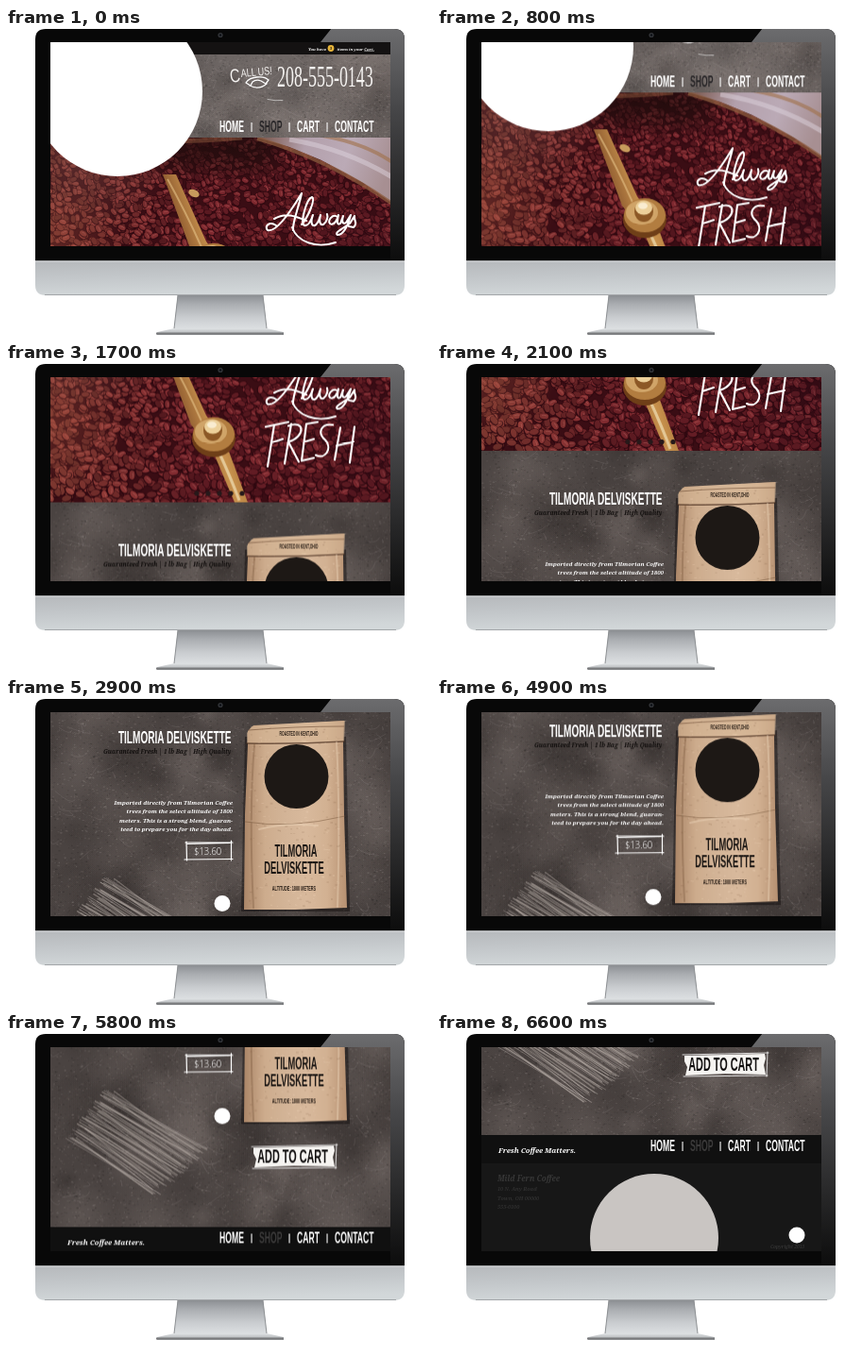
Recreate the animation shown at these times as an HTML page with a canvas. Size 450x325 px, loop 8000 ms.

```html
<!DOCTYPE html>
<html lang="en">
<head>
<meta charset="utf-8">
<title>Coffee shop on a desktop screen</title>
<style>
html, body { margin: 0; width: 100%; height: 100%; overflow: hidden; background: #fff; }
#stage { position: relative; width: 450px; height: 325px; overflow: hidden; }
#stage svg { position: absolute; left: 0; top: 0; display: block; }
#screen { position: absolute; left: 47px; top: 15px; width: 360px; height: 216px; overflow: hidden; background: #141212; }
#page { position: absolute; left: 0; top: 0; width: 360px; height: 770px; will-change: transform; animation: scroll 8s infinite; }
#page canvas { position: absolute; left: 0; top: 0; }
#stage #art { left: -47px; top: -15px; }

/* constant-speed scrolls, ten positions a second */
@keyframes scroll {
  0% { transform: translateY(0); animation-timing-function: step-end; }
  6.25% { transform: translateY(-6.8px); animation-timing-function: steps(24, end); }
  36.2499% { transform: translateY(-334.2px); animation-timing-function: step-end; }
  36.25% { transform: translateY(-327px); animation-timing-function: step-end; }
  61.25% { transform: translateY(-333.8px); animation-timing-function: steps(17, end); }
  82.4999% { transform: translateY(-565.7px); animation-timing-function: step-end; }
  82.5%, 100% { transform: translateY(-554px); }
}

.narrow { font-family: "Liberation Sans", Arial, sans-serif; font-weight: 700; }
.serif { font-family: "Noto Serif", serif; font-weight: 700; font-style: italic; }
.end { text-anchor: end; }
.mid { text-anchor: middle; }
.chalk { fill: none; stroke: #fff; stroke-linecap: round; stroke-linejoin: round; }
</style>
</head>
<body>
<div id="stage">
  <svg width="450" height="325" viewBox="0 0 450 325">
    <defs>
      <linearGradient id="chin" x1="0" y1="0" x2=".25" y2="1">
        <stop offset="0" stop-color="#b6b9bc"/><stop offset=".5" stop-color="#c3c7ca"/><stop offset="1" stop-color="#d2d7d9"/>
      </linearGradient>
      <linearGradient id="neck" x1="0" y1="0" x2="0" y2="1">
        <stop offset="0" stop-color="#85888c"/><stop offset=".25" stop-color="#a9acb0"/>
        <stop offset=".6" stop-color="#cbced1"/><stop offset=".85" stop-color="#dcdfe1"/><stop offset="1" stop-color="#a5a7aa"/>
      </linearGradient>
      <linearGradient id="gloss" x1="0" y1="0" x2="0" y2="1">
        <stop offset="0" stop-color="#6c6c6e"/><stop offset=".35" stop-color="#464648"/><stop offset="1" stop-color="#0c0c0c"/>
      </linearGradient>
      <clipPath id="case"><path d="M31 12Q31 1 42 1H411Q422 1 422 12V247H31Z"/></clipPath>
    </defs>
    <path d="M182 281H272L276 318 294 322V325H160V322L178 318Z" fill="url(#neck)"/>
    <path d="M182 283L178 318M272 283L276 318" stroke="#8d9093" fill="none"/>
    <path d="M159 323.5H294" stroke="#77787a" stroke-width="2"/>
    <g clip-path="url(#case)">
      <path d="M31 0H422V247H31Z" fill="#080808"/>
      <path d="M345 0H422V247H407V15H333Z" fill="url(#gloss)"/>
    </g>
    <path d="M31 246.500H422V272Q422 283 411 283H42Q31 283 31 272Z" fill="url(#chin)"/>
    <path d="M31 247H422" stroke="#dfe1e3"/>
    <path d="M41 282.500H413" stroke="#a2a5a8"/>
    <circle cx="227" cy="7.500" r="2.600" fill="#34363a"/><circle cx="227" cy="7.500" r="1.200" fill="#0d1016"/>
  </svg>

  <div id="screen"><div id="page">
    <canvas id="paint" width="360" height="770"></canvas>
    <svg id="art" width="450" height="800" viewBox="0 0 450 800">
      <!-- header -->
      <circle cx="118" cy="67" r="90" fill="#fff"/>
      <g class="serif" font-size="4.100" fill="#fff">
        <text x="320" y="23.500">You have</text>
        <circle cx="344" cy="21.500" r="3.400" fill="#e8b53a"/>
        <text class="mid" x="344" y="23" fill="#141212">3</text>
        <text class="end" x="390" y="23.500">items in your <tspan text-decoration="underline">Cart.</tspan></text>
      </g>
      <g fill="#f6f4f2" font-family="Liberation Serif, serif">
        <text font-size="31" transform="translate(287 62) scale(.58 1)">208-555-0143</text>
        <g font-family="Liberation Sans, sans-serif">
          <text font-size="20" transform="translate(238 58) rotate(-8) scale(.75 1)">C</text>
          <text font-size="12" transform="translate(249 52) rotate(-5) scale(.75 1)">ALL US!</text>
        </g>
      </g>
      <path class="chalk" stroke-width="1.300" d="M254 58C258 51 273 50 278 55L275 59 270 56Q265 54 261 57L259 61 254 58ZM258 61Q268 66 276 59"/>
      <path class="chalk" stroke-width=".9" opacity=".6" d="M277 75.500Q285 77.500 293 76.500"/>

      <!-- hand lettering on the photo -->
      <g class="chalk" stroke-width="2.100">
        <path d="M286 209C279 204 273 210 277 214C287 217 304 190 313 175C310 190 303 206 304 214M284 202C296 195 306 199 318 204"/>
        <path d="M313 208C320 200 328 181 324 179C318 181 311 207 316 209C320 210 323 204 325 198C322 206 324 210 327 209C331 207 332 201 333 198C331 206 333 209 336 208C340 205 341 200 340 197"/>
        <path d="M351 200C346 196 340 204 343 207C347 210 351 203 352 198C350 206 351 209 354 207L357 199C355 206 357 208 360 206L365 198C362 209 357 219 351 219C347 217 357 212 364 207L369 199C368 204 373 206 368 211L363 210"/>
        <path d="M303 211C308 226 328 234 349 227" stroke-width="1.900"/>
      </g>
      <g class="chalk" stroke-width="2.100" transform="translate(0 4)">
        <path d="M284 232L277 276M275 234L299 229M281 251L293 247"/>
        <path d="M302 231L295 273M299 233C317 226 317 245 299 250L310 271"/>
        <path d="M318 231L313 270 326 267M318 231L330 229M316 250L326 247"/>
        <path d="M346 232C334 230 329 240 338 248C346 257 338 269 328 264"/>
        <path d="M354 235L348 269M369 234L364 272M350 254L368 250"/>
      </g>
      <g fill="#26191a">
        <circle cx="202" cy="308.500" r="2.600"/><circle cx="214" cy="308.500" r="2.600"/><circle cx="226" cy="308.500" r="2.600"/>
        <circle cx="238" cy="308.500" r="2.600"/><circle cx="250" cy="308.500" r="2.600"/>
      </g>

      <!-- product -->
      <g class="serif end" font-size="6.100">
        <text x="238.500" y="386" font-size="6.200" fill="#120f0e">Guaranteed Fresh | 1 lb Bag | High Quality</text>
        <g fill="#fff">
          <text x="240" y="439.500">Imported directly from Tilmorian Coffee</text>
          <text x="240" y="449">trees from the select altitude of 1800</text>
          <text x="240" y="458.500">meters. This is a strong blend, guaran-</text>
          <text x="240" y="468">teed to prepare you for the day ahead.</text>
        </g>
      </g>
      <path class="chalk" stroke-width="1.200" d="M190 480H240M191 479L191.500 499M189 498L240 497.500M238.500 478V499M192 481.500L237 480.500"/>
      <text font-family="Open Sans, sans-serif" font-size="11" font-weight="300" fill="#fff" transform="translate(199 493) scale(.86 1)">$13.60</text>
      <circle cx="229" cy="544.500" r="8.500" fill="#fff"/>
      <circle cx="307.500" cy="410" r="34" fill="#1d1815"/>
      <path d="M262 578L347 576 348 581 346 588 348 598 305 597 263 599 265 590 262 584Z" fill="#f6f4f1"/>
      <path class="chalk" stroke-width=".8" d="M260 577L351 575M261 600L350 599M350 574L349 600"/>

      <!-- footer -->
      <g class="serif">
        <text x="65" y="681" font-size="7.600" fill="#fff">Fresh Coffee Matters.</text>
        <text x="64" y="711" font-size="8" fill="#383838">Mild Fern Coffee</text>
        <g font-size="5.500" fill="#303030">
          <text x="64" y="721">10 N. Any Road</text>
          <text x="64" y="730.500">Town, OH 00000</text>
          <text x="64" y="739.500">555-0100</text>
        </g>
        <text class="end" x="389" y="782" font-size="4.800" fill="#333">Copyright 2013</text>
      </g>
      <circle cx="230" cy="771" r="68" fill="#c9c5c2"/>
      <circle cx="381" cy="768" r="8.500" fill="#fff"/>
      <g id="labels" class="narrow"></g>
    </svg>
  </div></div>
</div>

<script>
// condensed lettering
const labels = document.getElementById('labels');
function label(text, x, y, size, fill, anchor = 'start') {
  const el = document.createElementNS('http://www.w3.org/2000/svg', 'text');
  el.textContent = text;
  el.setAttribute('transform', `translate(${x} ${y}) scale(.53 1)`);
  el.setAttribute('font-size', size);
  el.setAttribute('fill', fill);
  el.setAttribute('text-anchor', anchor);
  labels.append(el);
}
function nav(y, muted) {
  label('HOME', 226, y, 16.3, '#fff');
  label('SHOP', 268, y, 16.3, muted);
  label('CART', 308, y, 16.3, '#fff');
  label('CONTACT', 348, y, 16.3, '#fff');
  for (const x of [260, 300, 340]) label('I', x, y, 14, '#fff', 'middle');
}
nav(109.5, '#2a282a');
nav(679, '#3b3a3a');
label('TILMORIA DELVISKETTE', 238.5, 374.6, 19, '#fff', 'end');
label('ROASTED IN KENT,OHIO', 310, 367, 6.5, '#2c2119', 'middle');
label('TILMORIA', 307, 495, 17.6, '#1d1815', 'middle');
label('DELVISKETTE', 305, 513, 17.6, '#1d1815', 'middle');
label('ALTITUDE: 1800 METERS', 305, 531, 7.2, '#2c2119', 'middle');
label('ADD TO CART', 303.5, 593.8, 20.5, '#121010', 'middle');

// painted surfaces
const c = document.getElementById('paint').getContext('2d');
c.translate(-47, -15);
let seed = 41;
function rnd(a = 0, b = 1) {
  seed = (seed * 16807) % 2147483647;
  return a + (b - a) * seed / 2147483647;
}
function clipBox(y0, y1, fill) {
  c.save();
  c.beginPath();
  c.rect(47, y0, 360, y1 - y0);
  c.clip();
  c.fillStyle = fill;
  c.fillRect(47, y0, 360, y1 - y0);
}
function glow(x, y, r, rgb, alpha) {
  const g = c.createRadialGradient(x, y, 0, x, y, r);
  g.addColorStop(0, `rgba(${rgb},${alpha})`);
  g.addColorStop(1, `rgba(${rgb},0)`);
  c.fillStyle = g;
  c.fillRect(x - r, y - r, 2 * r, 2 * r);
}
function ramp(x0, y0, x1, y1, ...colors) {
  const g = c.createLinearGradient(x0, y0, x1, y1);
  colors.forEach((color, i) => g.addColorStop(i / (colors.length - 1), color));
  return g;
}
function poly(points, fill) {
  c.beginPath();
  points.forEach(([x, y]) => c.lineTo(x, y));
  c.closePath();
  c.fillStyle = fill;
  c.fill();
}
function oval(x, y, rx, ry, fill, turn = 0) {
  c.fillStyle = fill;
  c.beginPath();
  c.ellipse(x, y, rx, ry, turn, 0, 7);
  c.fill();
}
function stroke(x0, y0, cx, cy, x1, y1, width, color) {
  c.beginPath();
  c.moveTo(x0, y0);
  c.quadraticCurveTo(cx, cy, x1, y1);
  c.lineWidth = width;
  c.strokeStyle = color;
  c.stroke();
}
function slate(y0, y1, base, blots, specks) {
  clipBox(y0, y1, base);
  for (let i = 0; i < blots; i++)
    glow(rnd(47, 407), rnd(y0, y1), rnd(14, 60), rnd() < .5 ? '155,143,138' : '18,14,13', rnd(.06, .24));
  for (let i = 0; i < specks; i++) {
    c.fillStyle = rnd() < .5 ? `rgba(215,205,200,${rnd(.03, .16)})` : `rgba(10,8,8,${rnd(.04, .18)})`;
    c.fillRect(rnd(47, 407), rnd(y0, y1), rnd(.6, 2.5), rnd(.6, 1.6));
  }
  for (let i = 0; i < blots; i++) {
    const x = rnd(47, 407), y = rnd(y0, y1);
    stroke(x, y, x + rnd(-12, 12), y + 6, x + rnd(-22, 22), y + rnd(-12, 12), .6, 'rgba(220,210,205,.16)');
  }
  c.restore();
}
function beans(y0, y1) {
  clipBox(y0, y1, '#3a0d14');
  for (let i = 0; i < 3200; i++) {
    const x = rnd(43, 411), y = rnd(y0 - 4, y1 + 4), k = rnd();
    const size = .65 + .45 * (y - y0) / (y1 - y0), warm = Math.max(0, 1 - (x - 47) / 150);
    c.save();
    c.translate(x, y);
    c.rotate(rnd(-.5, 1.6));
    c.scale(size, size);
    oval(0, 0, 5.4, 3.8, 'rgba(46,9,16,.8)');
    oval(-.3, -.5, 4.7, 2.9, `rgb(${78 + k * 52 + warm * 22},${20 + k * 22 + warm * 24},${28 + k * 20 + warm * 10})`);
    if (k > .55) stroke(-2.6, -1, 0, -2, 2.6, -1, 1, 'rgba(205,125,120,.3)');
    c.restore();
  }
  glow(80, 130, 95, '125,75,68', .55);
  glow(52, 235, 75, '165,85,65', .35);
  for (let x = 180; x < 300; x += 30) glow(x, 128, 38, '28,12,11', .6);
  glow(395, 255, 80, '40,8,20', .35);
  // drum rim
  poly([[266, 116], [300, 126], [334, 140], [378, 164], [407, 184], [407, 116]],
    ramp(270, 120, 400, 165, '#7d5b52', '#b3a0ac', '#bbaab6', '#a78f92'));
  stroke(266, 117, 340, 138, 409, 186, 4, 'rgba(140,92,62,.75)');
  stroke(300, 118, 360, 128, 409, 158, 5, 'rgba(222,212,222,.5)');
  stroke(335, 114, 380, 122, 409, 142, 4, 'rgba(160,112,72,.6)');
  stroke(90, 116, 160, 124, 250, 116, 5, 'rgba(140,88,60,.5)');
  // brass arm and hub
  poly([[166, 155], [180, 155], [212, 226], [233, 256], [256, 318], [242, 318], [219, 264], [196, 236]],
    ramp(175, 205, 235, 185, '#83502a', '#c9934e', '#9a632e'));
  stroke(171, 160, 190, 194, 207, 232, 2, 'rgba(235,200,140,.55)');
  stroke(226, 266, 238, 292, 247, 316, 3, 'rgba(240,222,180,.7)');
  oval(199, 175, 6, 3.8, '#c79a5c', .4);
  oval(220, 250, 23, 20, '#6f3f18');
  oval(220, 246, 22, 18, '#b27d40');
  oval(217, 243, 17, 13, '#d0a468');
  oval(219, 242, 10, 11, '#8c5826');
  oval(219, 238, 9, 7.5, '#ecd09a');
  oval(218, 236, 5, 3.5, '#f9ecd0');
  c.restore();
}
function scribble() {
  c.lineCap = 'round';
  for (let i = 0; i < 11; i++) {
    const x0 = 108 - 4 * i, y0 = 519 + 4.8 * i, x1 = 209 - 5 * i, y1 = 580 + 4.6 * i;
    for (let j = 0; j < 5; j++) {
      const d = rnd(-2, 2);
      stroke(x0 + rnd(-6, 10), y0 + d, (x0 + x1) / 2, (y0 + y1) / 2 + d + rnd(-3, 3), x1 + rnd(-10, 5), y1 + d, rnd(.6, 1.5), 'rgba(188,178,173,.42)');
    }
  }
}
function bag() {
  poly([[253, 368], [360, 368], [364, 553], [249, 553]], 'rgba(15,11,10,.45)');
  poly([[256, 362], [262, 356], [358, 351], [357, 374], [358, 450], [361, 549], [306, 551], [252, 551], [253, 450], [256, 376]],
    ramp(252, 0, 362, 0, '#ab8668', '#cdac8d', '#d3b497', '#d8b99c', '#d2b192', '#b58f70'));
  poly([[255, 364], [260, 357], [359, 351], [358, 373], [306, 374], [255, 375]], 'rgba(214,182,148,.6)');
  stroke(255, 375, 306, 376, 358, 373, 1.6, 'rgba(75,48,32,.7)');
  stroke(257, 361, 306, 357, 358, 357, 1, 'rgba(100,68,46,.55)');
  stroke(253, 458, 300, 466, 359, 452, 1, 'rgba(110,78,52,.45)');
  stroke(263, 376, 257, 450, 262, 549, 2, 'rgba(110,78,52,.3)');
  stroke(350, 374, 354, 450, 351, 548, 2, 'rgba(238,215,188,.4)');
  stroke(268, 466, 295, 459, 330, 462, 2, 'rgba(240,218,190,.4)');
  for (let i = 0; i < 350; i++) {
    c.fillStyle = rnd() < .5 ? 'rgba(90,60,38,.12)' : 'rgba(250,230,205,.16)';
    c.fillRect(rnd(257, 355), rnd(358, 547), rnd(.6, 3), rnd(.6, 2));
  }
}
clipBox(15, 28, '#141212');
c.restore();
slate(28, 116, '#6d6664', 70, 4200);
beans(116, 318);
slate(318, 662, '#4a4341', 150, 9000);
scribble();
bag();
clipBox(662, 785, '#171717');
c.fillStyle = '#101010';
c.fillRect(47, 662, 360, 30);
c.restore();
</script>
</body>
</html>
```
